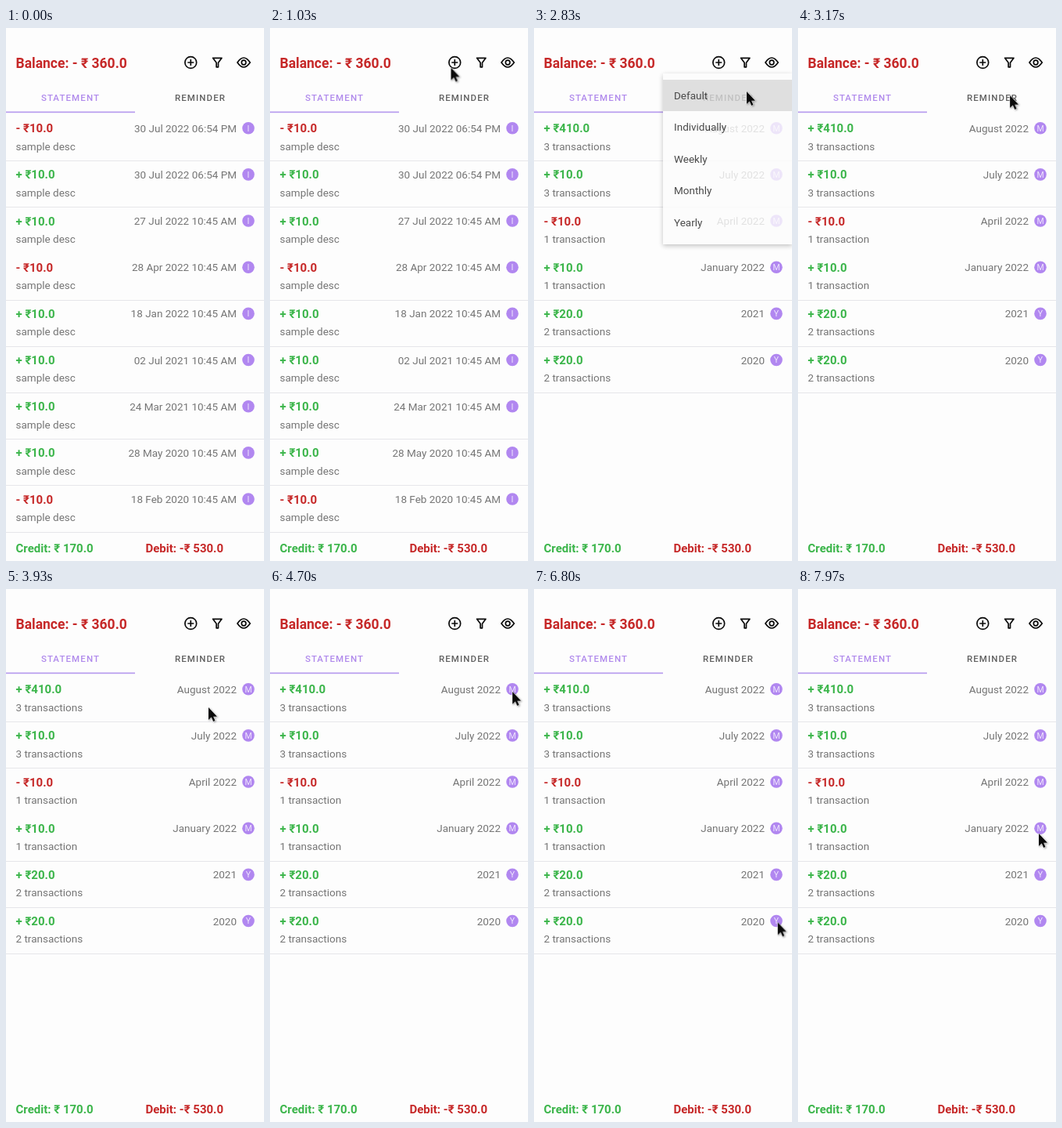
Animation, 330 px wide and 680 px high, one loop 8000 ms. Source, as an HTML page:

```html
<!DOCTYPE html>
<html lang="en">
<head>
<meta charset="utf-8">
<title>Account statement</title>
<style>
  html, body { margin: 0; width: 100%; height: 100%; overflow: hidden; background: #fdfdfd; }
  #stage { position: relative; width: 330px; height: 680px; overflow: hidden; font-family: Roboto, sans-serif; }
  svg { position: absolute; left: 0; top: 0; overflow: visible; }
  text { font-size: 13.5px; fill: #757575; }
  .amount { font-size: 15px; font-weight: 700; }
  .balance { font-size: 17.5px; font-weight: 700; }
  .credit { fill: #3bb54a; }
  .debit { fill: #c62828; }
  .tab { font-size: 11.5px; font-weight: 500; letter-spacing: 1.1px; text-anchor: middle; fill: #606060; }
  .tab.active { fill: #b08aec; }
  .date { text-anchor: end; }
  .badge { font-size: 10.5px; fill: #f0e6fd; text-anchor: middle; }
  .icon { fill: none; stroke: #0a0a0a; stroke-width: 1.7; }
  #menu { position: absolute; left: 165px; top: 58px; width: 165px; height: 218px; overflow: hidden;
    background: #fcfcfc; box-shadow: 0 2px 6px rgba(0, 0, 0, .3); opacity: 0; }
  #items { position: absolute; left: 0; top: 0; width: 165px; padding-top: 7.5px; }
  #items div { position: relative; height: 40.5px; line-height: 40.5px; padding-left: 14px; font-size: 13.5px; color: #212121; }
  #hover { position: absolute; left: 0; top: 8px; width: 165px; height: 39.5px; background: #d8d8d8; opacity: 0; }
  #cursor { filter: drop-shadow(1px 1px 1px rgba(0, 0, 0, .35)); }
</style>
</head>
<body>
<div id="stage">
  <svg width="330" height="680">
    <text class="balance debit" x="12.5" y="51">Balance: - ₹ 360.0</text>
    <g class="icon">
      <circle cx="236.3" cy="44" r="7.4"/>
      <path d="M236.3 40v8M232.3 44h8"/>
      <path d="M264.6 38.3h11.4l-4.5 5.9v5.6h-2.4v-5.6z" stroke-linejoin="round"/>
      <path d="M296 44q8-12 16.2 0q-8.2 12-16.2 0z"/>
      <circle cx="304.1" cy="44" r="2.8"/>
    </g>
    <text class="tab active" x="82.5" y="93">STATEMENT</text>
    <text class="tab" x="248.5" y="93">REMINDER</text>
    <rect y="106.5" width="165" height="1.7" fill="#b79cee"/>
    <g id="entries"></g>
    <g id="groups"></g>
    <text class="amount credit" x="12.5" y="669">Credit: ₹ 170.0</text>
    <text class="amount debit" x="178.5" y="669">Debit: -₹ 530.0</text>
  </svg>
  <div id="menu">
    <div id="items"><span id="hover"></span></div>
  </div>
  <svg id="cursor" width="14" height="20">
    <path d="M0 0V16L3.7 12.6 6.1 18 8.5 17 6.2 11.7H11z" fill="#0a0a0a" stroke="#fff" paint-order="stroke"/>
  </svg>
</div>
<script>
const LOOP = 8000, PITCH = 59.17;
const $ = id => document.getElementById(id);

const entries = [
  ['-', '30 Jul 2022 06:54 PM'], ['+', '30 Jul 2022 06:54 PM'], ['+', '27 Jul 2022 10:45 AM'],
  ['-', '28 Apr 2022 10:45 AM'], ['+', '18 Jan 2022 10:45 AM'], ['+', '02 Jul 2021 10:45 AM'],
  ['+', '24 Mar 2021 10:45 AM'], ['+', '28 May 2020 10:45 AM'], ['-', '18 Feb 2020 10:45 AM']
].map(([sign, date]) => [sign, '10.0', 'sample desc', date, 'I']);

const groups = [
  ['+', '410.0', '3 transactions', 'August 2022', 'M'],
  ['+', '10.0', '3 transactions', 'July 2022', 'M'],
  ['-', '10.0', '1 transaction', 'April 2022', 'M'],
  ['+', '10.0', '1 transaction', 'January 2022', 'M'],
  ['+', '20.0', '2 transactions', '2021', 'Y'],
  ['+', '20.0', '2 transactions', '2020', 'Y']
];

function row([sign, amount, note, date, badge], i) {
  const divider = i === 2 ? '' :
    `<rect y="${Math.round(169.3 + i * PITCH)}" width="330" height="1" fill="#e6e6ea"/>`;
  return `<g transform="translate(0 ${i * PITCH})">
    <text class="amount ${sign === '+' ? 'credit' : 'debit'}" x="12.5" y="133.3">${sign} ₹${amount}</text>
    <text x="12.5" y="155.5">${note}</text>
    <text class="date" x="295" y="132.7">${date}</text>
    <circle cx="310" cy="127.7" r="7.8" fill="#b187f0"/>
    <text class="badge" x="310" y="131.5">${badge}</text>
  </g>${divider}`;
}

$('entries').innerHTML = entries.map(row).join('');
$('groups').innerHTML = groups.map(row).join('');
for (const label of ['Default', 'Individually', 'Weekly', 'Monthly', 'Yearly']) {
  const item = document.createElement('div');
  item.textContent = label;
  $('items').append(item);
}

// Each step is [time in ms, styles, optional easing towards the next step].
function play(id, steps) {
  const frames = steps.map(([ms, style, easing = 'linear']) => ({ offset: ms / LOOP, easing, ...style }));
  const last = frames[frames.length - 1];
  if (frames[0].offset > 0) frames.unshift({ ...frames[0], offset: 0, easing: 'linear' });
  if (last.offset < 1) frames.push({ ...last, offset: 1 });
  $(id).animate(frames, { duration: LOOP, iterations: Infinity });
}

const toggle = (id, ...steps) =>
  play(id, steps.map(([ms, opacity]) => [ms, { opacity }, 'steps(1, end)']));

const SWAP = 2750;
toggle('entries', [0, 1], [SWAP, 0]);
toggle('groups', [0, 0], [SWAP, 1]);
toggle('hover', [0, 0], [2480, 1], [3100, 0]);

const box = (left, top, width, height, opacity) =>
  ({ left: left + 'px', top: top + 'px', width: width + 'px', height: height + 'px', opacity });
const open = box(165, 58, 165, 218, 1);
play('menu', [
  [1960, box(222, 42, 106, 105, 0)],
  [2030, box(189, 47, 140, 169, 1), 'ease-out'],
  [2190, open],
  [2785, open],
  [2830, { ...open, opacity: .82 }],
  [2980, { ...open, opacity: 0 }]
]);

const shift = (x, y) => ({ transform: `translate(${x}px, ${y}px)` });
play('items', [
  [1960, shift(-25, -46)],
  [2030, shift(-13, -22.5), 'ease-out'],
  [2190, shift(0, 0)]
]);

play('cursor', [
  [0, -20, 125], [250, -20, 125], [900, 231.5, 50.5], [1150, 231.5, 50.5],
  [1400, 266, 45], [1600, 268, 44], [1830, 297, 43], [1970, 312, 45], [2120, 312, 45],
  [2550, 272, 81], [3050, 272, 81], [3700, 259, 151], [4060, 259, 151],
  [4440, 307, 134], [4830, 311, 130], [5870, 311, 130],
  [6130, 312, 215], [6400, 313, 325], [6670, 312, 420], [7070, 311, 444], [7290, 311, 444],
  [7900, 308, 312]
].map(([ms, x, y]) => [ms, shift(x, y), 'ease-in-out']));
</script>
</body>
</html>
```
